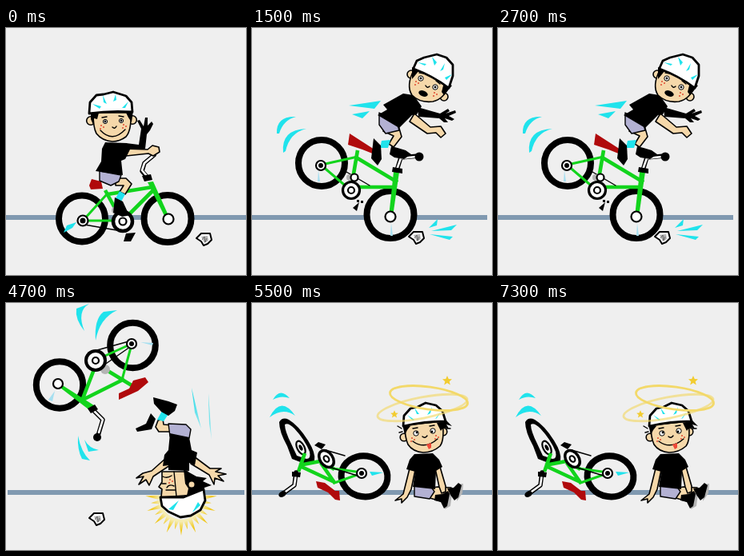
Recreate the animation shown at these times as an HTML page. Size 300 px wide and 309 px high, loop 8500 ms.

```html
<!DOCTYPE html>
<html lang="en">
<head>
<meta charset="utf-8">
<title>Bike fall</title>
<style>
html, body { margin: 0; width: 100%; height: 100%; overflow: hidden; background: #efefef }
svg { display: block; width: 100vw; height: 100vh }
path, circle, ellipse { stroke-linejoin: round }
.road { fill: none; stroke: #8099b0; stroke-width: 6 }
.tyre { fill: #efefef; stroke: #000; stroke-width: 8 }
.hub { fill: #fff; stroke: #000; stroke-width: 2.2 }
.eye { fill: #fff; stroke: #000; stroke-width: 1 }
.green { fill: none; stroke: #12d41c; stroke-width: 4.6 }
.thin { stroke-width: 3 }
.red { fill: #b00a0c }
.cyan { fill: #20e3ec }
.pale { fill: #a6dff0 }
.skin { fill: #f5d8aa; stroke: #000; stroke-width: 1.6 }
.white { fill: #fff; stroke: #000; stroke-width: 2.8 }
.short { fill: #b3b1d3; stroke: #000; stroke-width: 1.4 }
.line { fill: none; stroke: #000; stroke-width: 1.4; stroke-linecap: round }
.bar { stroke-width: 5.5 }
.core { fill: none; stroke: #fff; stroke-width: 2.6; stroke-linecap: round }
.spot { fill: #e04a30 }
.grey { fill: #b4b4b4 }
.gold { fill: #f2cc30 }
.ring { fill: none; stroke: #f3d96a; stroke-width: 2.8 }
</style>
</head>
<body>
<svg viewBox="0 0 300 309" preserveAspectRatio="none">
<defs>
  <g id="rock">
    <path class="white" style="stroke-width:2" d="M-10-1-4-7 7-7 9 1 4 6-1 8-4 3Z"/>
    <path class="grey" d="M-4-3 4-4 5 2 0 5-2 1Z"/>
    <path d="M-3 1 0-3 1 4 3-1" fill="none" stroke="#555" stroke-width=".8"/>
  </g>
  <g id="freckles" class="spot">
    <circle r="1"/><circle cx="3" cy="2" r="1"/><circle cx="-1" cy="4" r="1"/>
  </g>
  <path id="star" class="gold" d="M0-6 1.8-2 6-1.7 2.7 1.2 3.8 5.5 0 3-3.8 5.5-2.7 1.2-6-1.7-1.8-2Z"/>
  <radialGradient id="glow" gradientUnits="userSpaceOnUse" cx="219" cy="246" r="45">
    <stop offset=".6" stop-color="#f6edb4"/><stop offset=".85" stop-color="#f0c820"/>
  </radialGradient>
  <linearGradient id="fall" x2="0" y2="1">
    <stop offset="0" stop-color="#20dbe8"/><stop offset="1" stop-color="#b5eaf0"/>
  </linearGradient>
</defs>

<!-- riding -->
<g class="scene">
  <path class="road" d="M0 237H300"/>
  <circle class="tyre" cx="95" cy="238.5" r="29"/>
  <circle class="tyre" cx="202" cy="238.5" r="29.5"/>
  <path class="cyan" d="M72 256 76 247 88 243 83 250Z"/>
  <path class="red" d="M107 189 119 192 121 201 106 202 104 197Z"/>
  <path class="green" d="M124 203 143 238M127 208 183 199M184 203 148 239"/>
  <path fill="#12d41c" d="M177 193 184 192 205 239 200 239Z"/>
  <path class="green thin" d="M97 240 126 208M97 241H146"/>
  <path class="line" d="M98 246 150 255"/>
  <circle class="hub" cx="96" cy="241" r="6.5"/><circle cx="96" cy="241" r="3.5"/>
  <circle class="hub" cx="203" cy="239" r="6.5"/>
  <circle class="grey" cx="137" cy="228" r="5"/>
  <circle class="hub" cx="146" cy="242" r="12" style="stroke-width:4.5"/>
  <circle class="hub" cx="146" cy="242" r="4.5"/>
  <path d="M150 257 162 256 156 267 147 267Z"/>
  <path class="line bar" d="M176 186 170 179 173 169 185 159"/>
  <path class="core" d="M176 185 170 178 173 169 185 159"/>
  <path d="M170 185 181 183 183 190 173 192Z"/>
  <path class="skin" d="M137 188 150 188 157 195 149 208 142 205 147 197 137 197Z"/>
  <path class="cyan" d="M142 204 149 208 144 217 137 213Z"/>
  <path d="M136 212 146 217 152 230 157 234 145 236 134 231Z"/>
  <path class="short" d="M117 179 144 184 141 192 131 197 117 191Z"/>
  <path d="M150 144 166 146 169 126 164 116 167 115 172 123 174 112 177 112 177 122 182 117 184 120 180 128 176 133 174 151 151 157Z"/>
  <path class="skin" d="M148 151 177 152 183 147 191 149 192 155 184 160 178 157 150 160Z"/>
  <path d="M124 143 151 144 155 152 149 164 144 166 146 184 112 179 119 167 120 151Z"/>
  <circle class="skin" cx="106" cy="116" r="5.3"/><circle class="skin" cx="158" cy="115" r="5.3"/>
  <path class="skin" d="M109 106H156Q157 128 150 136 142 142 133 142 120 141 113 132 109 125 109 106Z"/>
  <path d="M106 104 116 106 114 114 110 113 109 121 106 114ZM150 106 159 103 157 118 153 112Z"/>
  <path class="white" d="M104 106 105 93 113 84 122 83 134 80 150 85 157 93 158 105Q130 103 104 107Z"/>
  <path class="cyan" d="M108 95 119 98 117 101ZM121 84 126 95 122 93ZM137 83 134 92 138 90ZM153 92 145 100 149 100Z"/>
  <circle class="eye" cx="124" cy="117" r="2.6"/><circle cx="124" cy="117" r="1.4"/>
  <circle class="eye" cx="144" cy="116" r="2.6"/><circle cx="144" cy="116" r="1.4"/>
  <path class="line" d="M120 112 126 111M141 110 147 111M133 124Q136 127 138 123M118 128Q133 144 149 127"/>
  <use href="#freckles" x="119" y="122"/><use href="#freckles" x="147" y="121"/>
  <use href="#rock" x="248" y="264"/>
</g>

<!-- hitting the stone -->
<g class="scene">
  <path class="road" d="M0 237H294"/>
  <path class="cyan" d="M31 132Q30 110 55 111 39 115 34 132ZM39 156Q36 127 68 126 47 131 42 154ZM121 97 161 91 153 101ZM125 108 147 104 138 113ZM221 250 232 239 231 247ZM224 254 256 246 249 253ZM222 258 251 261 247 265Z"/>
  <circle class="tyre" cx="87" cy="169" r="29"/>
  <circle class="tyre" cx="173" cy="233.5" r="29.5"/>
  <path class="pale" d="M83 178 85 192 82 192ZM174 244 176 260 173 260Z"/>
  <path class="red" d="M122 132 153 152 158 160 138 152 120 146Z"/>
  <path class="green" d="M132 153 124 200M132 163 182 193M126 199H181"/>
  <path fill="#12d41c" d="M177 180 184 180 176 236 171 236Z"/>
  <path class="green thin" d="M87 171 132 161M87 172 121 201"/>
  <path class="line" d="M118 180 147 197M129 188 124 203"/>
  <circle class="grey" cx="122" cy="187" r="4"/>
  <circle class="hub" cx="128" cy="187" r="4.5"/>
  <circle class="hub" cx="124" cy="203" r="10.5" style="stroke-width:3.2"/>
  <circle class="hub" cx="124" cy="203" r="4"/>
  <path d="M126 225 134 218 131 229ZM131 215H134V218H131ZM136 216H139V219H136Z"/>
  <circle class="hub" cx="86" cy="172" r="6"/><circle cx="86" cy="172" r="3"/>
  <circle class="hub" cx="173" cy="236" r="6.5"/>
  <path class="line bar" d="M181 178 186 162 208 160"/>
  <path class="core" d="M181 177 186 163 205 161"/>
  <path d="M176 174 188 176 188 182 175 180Z"/>
  <circle cx="209" cy="161" r="5.5"/>
  <path d="M174 148 182 150 192 153 199 158 190 164 178 162 172 158Z"/>
  <path class="skin" d="M164 129 183 122 187 136 177 149 171 145 177 135Z"/>
  <path class="cyan" d="M162 141 173 140 170 150 160 150Z"/>
  <path d="M152 138 161 147 162 164 157 172 149 163Z"/>
  <path class="short" d="M159 106 181 118 184 128 167 132 159 121Z"/>
  <path class="skin" d="M203 107 223 124 236 123 242 132 236 137 230 131 219 132 197 117Z"/>
  <path d="M207 99 235 107 245 101 247 104 242 107 254 103 255 106 246 110 253 114 250 116 241 113 245 118 240 118 234 113 208 111Z"/>
  <path d="M164 96 189 82 202 84 212 98 206 108 200 109 184 125 157 109 169 102Z"/>
  <circle class="skin" cx="199" cy="58" r="5"/><circle class="skin" cx="240" cy="86" r="5"/>
  <path class="skin" d="M203 51 247 71Q240 89 226 92 210 94 200 84 192 72 203 51Z"/>
  <path d="M200 49 209 53 200 64ZM240 68 250 72 240 84 237 80Z"/>
  <path class="white" d="M202 50 206 41 215 37 231 33 243 37 251 46 251 60 246 75Q226 60 202 51Z"/>
  <path class="cyan" d="M207 43 218 45 216 47ZM225 36 228 47 231 43ZM241 44 235 54 239 52ZM250 58 241 62 243 65Z"/>
  <circle class="eye" cx="211" cy="63" r="3.2"/><circle cx="211" cy="63" r="1.4"/>
  <circle class="eye" cx="229" cy="74" r="3.2"/><circle cx="229" cy="74" r="1.4"/>
  <path class="line" d="M209 56 215 57M230 66 235 70M217 72Q219 76 222 73"/>
  <ellipse cx="214" cy="82" rx="6" ry="3.5" transform="rotate(20 214 82)"/>
  <use href="#freckles" x="205" y="67"/><use href="#freckles" x="228" y="81"/>
  <use href="#rock" x="206" y="262"/>
</g>

<!-- upside down -->
<g class="scene">
  <path class="road" d="M2 237H298"/>
  <path class="cyan" d="M104 1Q88 10 98 35 86 20 88 7ZM139 9Q117 19 112 47 110 20 122 11ZM90 166Q94 187 105 197L95 195Q89 184 90 166ZM98 171Q104 182 116 184L103 186Z"/>
  <path fill="url(#fall)" d="M232 106 244 157 236 137ZM253 113 257 171 254 151Z"/>
  <circle class="tyre" cx="67" cy="102.5" r="29.2"/>
  <circle class="tyre" cx="158.5" cy="53" r="28.3"/>
  <path class="pale" d="M61 110 58 123 53 121ZM168 49 184 50 183 53Z"/>
  <path class="green" d="M112 78 95 122M94 122 148 95M111 75 157 103"/>
  <path fill="#12d41c" d="M66 100 113 130 107 136 64 103Z"/>
  <path class="green thin" d="M157 52 145 96M157 51 113 71"/>
  <path class="line" d="M157 47 103 62M155 55 119 80"/>
  <circle class="grey" cx="124" cy="83" r="6"/>
  <path class="red" d="M141 113 154 107 159 97 174 93 178 99 165 110 141 121Z"/>
  <circle class="hub" cx="112" cy="72" r="12" style="stroke-width:4"/>
  <circle class="hub" cx="112" cy="72" r="4"/>
  <circle class="hub" cx="65" cy="101" r="6"/>
  <circle class="hub" cx="157" cy="51" r="6"/><circle cx="157" cy="51" r="3"/>
  <path class="line bar" d="M108 133 121 146 115 166"/>
  <path class="core" d="M109 134 121 146 116 162"/>
  <path d="M102 132 111 127 115 133 106 138Z"/>
  <circle cx="114" cy="168" r="5"/>
  <path id="burst" fill="url(#glow)"/>
  <path class="skin" d="M190 147 196 145 197 152 208 153 207 161 191 161 187 155Z"/>
  <path class="cyan" d="M195 135 203 139 197 148 189 146Z"/>
  <path d="M184 118 203 123 214 127 211 135 203 141 194 136 185 126ZM181 138 187 145 182 158 164 161 162 157 175 151Z"/>
  <path class="skin" d="M201 193 182 210 171 213 163 219 172 217 166 227 175 221 179 228 184 217 205 203Z"/>
  <path class="skin" d="M235 192 255 207 269 207 262 211 275 214 265 216 272 223 261 219 260 227 254 215 231 201Z"/>
  <path class="short" d="M203 151 225 152 231 158 229 169 205 167Z"/>
  <path d="M205 163 229 168 232 184 239 187 236 203 229 200 229 210 203 209 203 203 196 204 198 190 203 184Z"/>
  <path class="skin" d="M195 211 227 211 236 240 194 243 195 233 191 230 195 224Z"/>
  <path d="M222 208 238 217 251 219 246 223 257 228 248 231 248 239 226 241 228 232 224 226Z"/>
  <circle class="skin" cx="232" cy="227" r="4.3"/>
  <path class="white" d="M193 243 222 243 247 233 249 247 243 259 231 266 218 268 203 261 195 254Z"/>
  <path class="cyan" d="M203 258 216 247 209 259ZM233 262 240 249 243 253Z"/>
  <path class="line" d="M201 231Q204 226 210 229M200 234 211 234M196 217Q201 220 207 216M210 211 213 242M195 226 200 226"/>
  <use href="#freckles" x="205" y="221"/>
  <use href="#rock" x="114" y="270"/>
</g>

<!-- dazed -->
<g class="scene">
  <path class="road" d="M0 237H300"/>
  <path class="cyan" d="M26 121Q35 105 47 119 36 115 26 121ZM22 143Q36 115 54 141 39 130 22 143Z"/>
  <path d="M34 149Q38 142 46 146 58 153 70 172 80 188 78 197 74 203 63 200L50 195 44 179Q34 161 34 149Z"/>
  <path fill="#efefef" d="M41 152Q45 149 53 157 66 171 72 186 74 195 68 195L56 191 49 176Q41 160 41 152Z"/>
  <g transform="rotate(-27 61 181)">
    <ellipse class="hub" cx="61" cy="181" rx="4.5" ry="9"/>
    <ellipse cx="61" cy="181" rx="2" ry="4"/>
  </g>
  <ellipse class="tyre" cx="140.5" cy="216.8" rx="29" ry="25.500" transform="rotate(8 140.5 216.8)"/>
  <path class="cyan" d="M147 211 164 212 150 216Z"/>
  <path class="red" d="M80 223 91 225 104 235 109 235 110 247 104 246 95 237 82 231Z"/>
  <path class="green" d="M59 203 85 198 103 208M60 204 103 224M86 200 104 226M66 188 58 211"/>
  <path class="green thin" d="M101 207 137 212M103 225 137 213"/>
  <path class="line" d="M92 184 116 191M99 206 135 217"/>
  <g transform="rotate(-35 93 195)">
    <ellipse class="hub" cx="93" cy="195" rx="8" ry="11.500" style="stroke-width:3.5"/>
    <ellipse class="hub" cx="93" cy="195" rx="3" ry="4"/>
  </g>
  <path d="M78 178 83 174 92 177 87 183Z"/>
  <circle class="hub" cx="137" cy="213" r="6"/><circle cx="137" cy="213" r="3"/>
  <path class="line bar" d="M55 212 53 228 38 239"/>
  <path class="core" d="M55 214 53 228 42 236"/>
  <path d="M50 211 61 212 60 218 50 217Z"/>
  <ellipse cx="38" cy="239" rx="5" ry="3.5" transform="rotate(-30 38 239)"/>
  <path class="skin" d="M197 207 204 209 199 233 194 243 187 250 187 245 179 247 189 239Z"/>
  <path class="skin" d="M219 232 232 230 249 231 248 238 236 248 219 243Z"/>
  <path class="short" d="M203 227 224 230 228 236 222 245 203 242Z"/>
  <path class="grey" d="M243 237 250 238 248 254 241 258ZM257 227 264 226 263 238 256 248Z"/>
  <path d="M229 240 238 239 245 235 247 239 244 254 240 257 236 249 228 247ZM244 232 252 231 258 225 262 228 258 243 253 247 248 240Z"/>
  <path class="skin" d="M229 207 235 205 242 229 242 236 237 238 234 230Z"/>
  <path d="M203 189 226 188 234 196 238 205 230 210 229 233 201 230 204 211 193 208 197 196Z"/>
  <circle class="skin" cx="190" cy="168" r="4.8"/><circle class="skin" cx="239" cy="161" r="4.8"/>
  <path class="skin" d="M191 153 238 148Q241 171 235 179 226 187 214 187 201 186 195 177 191 168 191 153Z"/>
  <path d="M188 152 198 154 194 159 191 165ZM231 150 243 147 250 154 243 152 246 157 239 156 236 160Z"/>
  <path class="line" d="M187 157 182 154M188 161 184 162M243 157 248 157"/>
  <path class="white" d="M189 154 190 141 198 132 207 130 217 125 230 128 238 135 242 148Q216 148 189 154Z"/>
  <path class="cyan" d="M194 140 203 146 201 147ZM203 131 209 139 206 139ZM225 130 219 140 223 138ZM236 136 229 145 231 144Z"/>
  <circle class="eye" cx="205" cy="163" r="3.2"/><circle cx="206" cy="162" r="1.4"/>
  <circle class="eye" cx="226" cy="160" r="3.2"/><circle cx="225" cy="161" r="1.4"/>
  <path class="line" d="M201 157 207 156M222 154 228 153M213 167Q216 170 219 166M201 173Q216 184 232 170"/>
  <path fill="#ef4938" d="M218 177 224 175 224 181 221 183Z"/>
  <use href="#freckles" x="200" y="169"/><use href="#freckles" x="230" y="166"/>
  <ellipse class="ring" cx="221" cy="119" rx="49" ry="14" transform="rotate(8 221 119)"/>
  <ellipse class="ring" cx="213" cy="131" rx="57" ry="13" transform="rotate(-11 213 131)" opacity=".65"/>
  <use href="#star" x="244" y="97"/>
  <use href="#star" transform="translate(178 139) scale(.8)"/>
</g>
</svg>
<script>
const scenes = document.querySelectorAll('.scene');
const ends = [1500, 3500, 5500, 8500];

// Impact rays fan out below the helmet.
const at = (r, a) => `${219 + r * Math.cos(a)} ${246 + r * Math.sin(a)}`;
let rays = '';
for (let i = 0; i <= 16; i++) {
  const a = -0.1 + i * (Math.PI + 0.2) / 16;
  rays += `M${at(25, a - 0.13)}L${at(i % 2 ? 38 : 45, a)} ${at(25, a + 0.13)}Z`;
}
document.getElementById('burst').setAttribute('d', rays);

function draw() {
  const t = performance.now() % 8500;
  const now = ends.findIndex(end => t < end);
  scenes.forEach((s, i) => s.style.display = i === now ? '' : 'none');
  requestAnimationFrame(draw);
}
draw();
</script>
</body>
</html>
```
